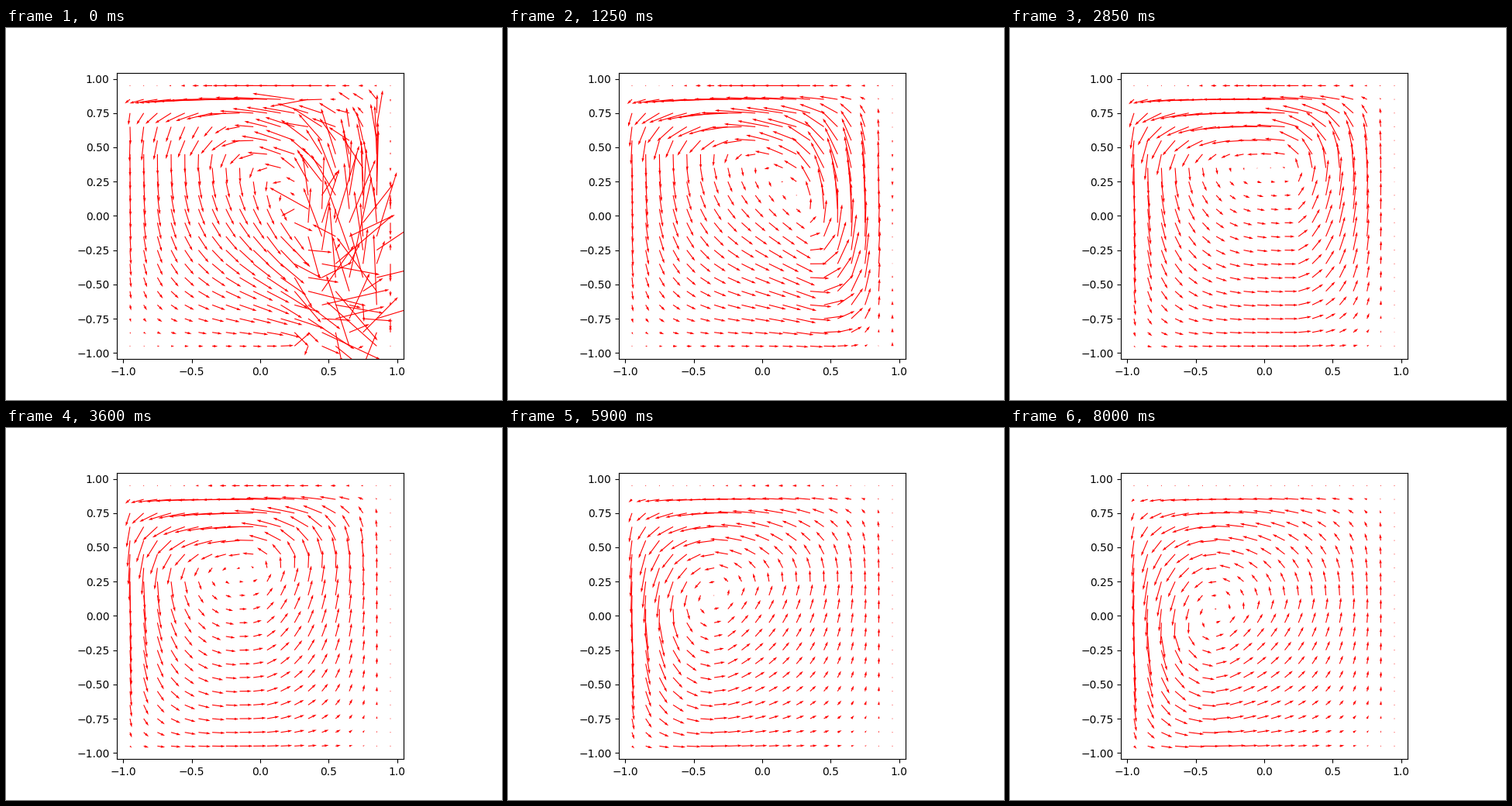
Recreate the animation shown at these times as a matplotlib script. Size 640 px wide and 480 px high, loop 8050 ms.

```python
import numpy as np
import matplotlib.pyplot as plt
from matplotlib.animation import FuncAnimation

FRAMES, STEP = 161, 50
LOW, HIGH = -1.0, 0.9          # slip walls of the box
AXES_PX = 369.6                # arrow lengths are in pixels

axis = np.linspace(-0.95, 0.95, 20)
X, Y = np.meshgrid(axis, axis)


def bell(x, mid, width):
    return np.exp(-((x - mid) / width) ** 2)


def sigmoid(x):
    return 1 / (1 + np.exp(-x))


def hill(z, peak, lower, upper):
    """1 at the peak, 0 at both walls; each side has its own (p, r)."""
    up = z > peak
    d = np.abs(z - peak) / np.where(up, HIGH - peak, peak - LOW)
    p = np.where(up, upper[0], lower[0])
    r = np.where(up, upper[1], lower[1])
    return (1 - np.clip(d, 0, 1) ** p) ** r


def stream(x, y, t):
    """Stream function of the drifting vortex, t in seconds."""
    shift = sigmoid((t - 3.5) / 0.5)
    young = bell(t, 0, 2)
    cx = 0.28 - 0.63 * shift
    cy = -0.05 + 0.38 * bell(t, 3.1, 2.07 if t < 3.1 else 3.2)
    lean = 0.6 * bell(t, 0, 2.5) - 0.12
    ridge = cy + lean * np.tanh((cx - x) / 0.4)
    amp = 15.3 + 11 * np.exp(-t / 1.8)

    left = 2 + bell(t, 2.8, 1.2) - 0.6 * np.exp(-t / 0.8), 1
    right = 2 - 0.6 * shift, 1.8 - 0.65 * shift
    bottom = 1.4 + 0.6 * young, 1 + 0.6 * young
    top = 2, 1.1
    return amp * hill(x, cx, left, right) * hill(y, ridge, bottom, top)


def diffuse(f, rate=0.06):
    g = np.pad(f, 1, mode="edge")
    return f + rate * (g[2:, 1:-1] + g[:-2, 1:-1]
                       + g[1:-1, 2:] + g[1:-1, :-2] - 4 * f)


def make_burst():
    """Turbulent patch on the right and jets along the walls, fading out."""
    rng = np.random.default_rng(7)
    low = sigmoid((0.1 - Y) / 0.06)
    patch = sigmoid((X - 0.27) / 0.05)
    amp = patch * (8 + 27 * low)
    mean = patch * bell(Y, -0.25, 0.3)
    u = amp * rng.normal(size=X.shape) + 18 * mean
    v = amp * rng.normal(size=X.shape) + 10 * mean
    u += bell(X, -0.25, 0.5) * (28 * bell(Y, 0.68, 0.1)
                                - 10 * bell(Y, 0.85, 0.05))
    v += 40 * bell(X, 0.85, 0.08) * (Y > 0) * (Y < 0.7)
    frames = []
    for k in range(FRAMES):
        fade = np.exp(-k / 12)
        frames.append((u * fade, v * fade))
        u, v = diffuse(u), diffuse(v)
    return frames


BURST = make_burst()


def field(k, h=0.01):
    t = k * STEP / 1000
    bu, bv = BURST[k]
    u = (stream(X, Y + h, t) - stream(X, Y - h, t)) / (2 * h) + bu
    v = (stream(X - h, Y, t) - stream(X + h, Y, t)) / (2 * h) + bv
    # Nearly still cells along the top and right walls.
    u[-1] = -30 * (1 - t / 8.2) ** 1.3 * bell(axis, 0.12, 0.5)
    u[:, -1] = 0
    v[:, -1] = 0.4 * bv[:, -1] - 9 * bell(t, 0, 2) * np.cos(3 * (axis - 0.25))
    v[-1] = 0
    return u, v


fig, ax = plt.subplots(figsize=(6.4, 4.8), dpi=100)
ax.set_aspect("equal")
ax.set(xlim=(-1.045, 1.045), ylim=(-1.045, 1.045))
ax.set_xticks(np.linspace(-1, 1, 5))
ax.set_yticks(np.linspace(-1, 1, 9))
arrows = ax.quiver(X, Y, *field(0), color="red", width=0.003,
                   scale=AXES_PX, scale_units="width")


def draw(k):
    arrows.set_UVC(*field(k))
    return (arrows,)


anim = FuncAnimation(fig, draw, frames=FRAMES, interval=STEP,
                     repeat=True, repeat_delay=0, blit=False)
plt.show()
```
